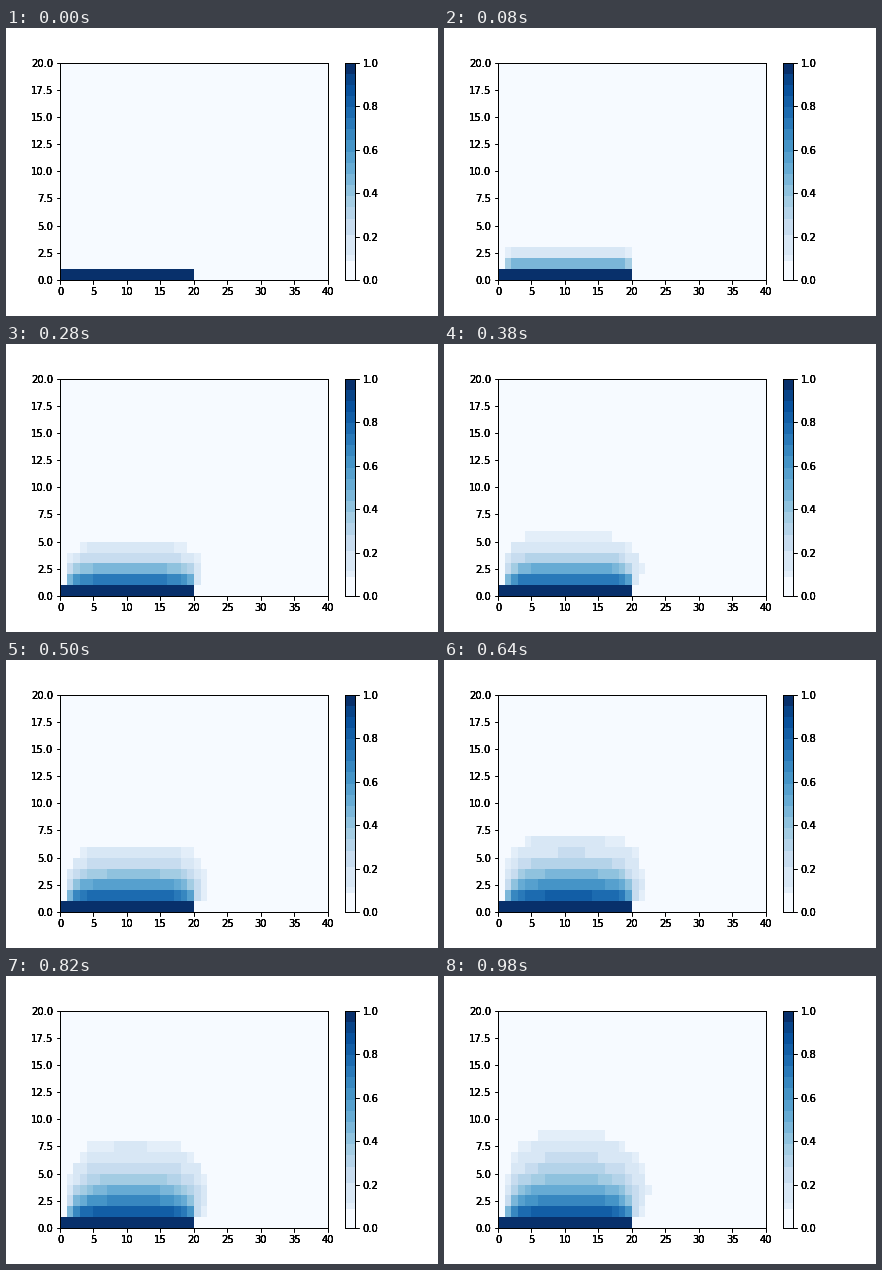
Animation, 432 px wide and 288 px high, one loop 1 s. Source, as a matplotlib script:

```python
import numpy as np
import matplotlib.pyplot as plt
from matplotlib.animation import FuncAnimation
from matplotlib.colors import ListedColormap

ROWS, COLS, HOT = 20, 40, 20
FRAMES, INTERVAL = 50, 20
PLOT_BOX = [0.125, 0.125, 0.62, 0.755]
BAR_BOX = [0.78375, 0.125, 0.02517, 0.755]
INK_LAYERS = 3  # repeated drawing gives the text and lines their hard edges


def banded_blues():
    """Blues reduced to a few flat bands."""
    edges = np.r_[0, 0.088, 0.115, 0.205, 0.28, 0.335, np.linspace(0.385, 0.95, 12), 1]
    mids = (edges[:-1] + edges[1:]) / 2
    mids[0], mids[-1] = 0.005, 1
    values = (np.arange(512) + 0.5) / 512
    band = np.digitize(values, edges[1:-1])
    return ListedColormap(plt.get_cmap("Blues")(mids[band]))


def relax(field):
    """One Jacobi step of the Laplace equation with fixed borders."""
    new = field.copy()
    new[1:-1, 1:-1] = (field[:-2, 1:-1] + field[2:, 1:-1]
                       + field[1:-1, :-2] + field[1:-1, 2:]) / 4
    return new


def add_ink(box, xlim, ylim, bar=False):
    """Transparent axes that only repeat the frame, ticks and labels."""
    for _ in range(INK_LAYERS):
        layer = fig.add_axes(box, facecolor="none", xlim=xlim, ylim=ylim)
        if bar:
            layer.set_xticks([])
            layer.yaxis.tick_right()


start = np.zeros((ROWS, COLS))
start[0, :HOT] = 1
states = [start]
for _ in range(FRAMES - 2):
    states.append(relax(states[-1]))

fig = plt.figure(figsize=(6, 4), dpi=72, facecolor="white")
ax = fig.add_axes(PLOT_BOX)
mesh = ax.pcolormesh(start, cmap=banded_blues(), vmin=0, vmax=1)
fig.colorbar(mesh, cax=fig.add_axes(BAR_BOX))
add_ink(PLOT_BOX, (0, COLS), (0, ROWS))
add_ink(BAR_BOX, (0, 1), (0, 1), bar=True)


def update(frame):
    mesh.set_array(states[max(frame - 1, 0)])
    return [mesh]


anim = FuncAnimation(fig, update, frames=FRAMES, interval=INTERVAL,
                     repeat=True, repeat_delay=0)
plt.show()
```
